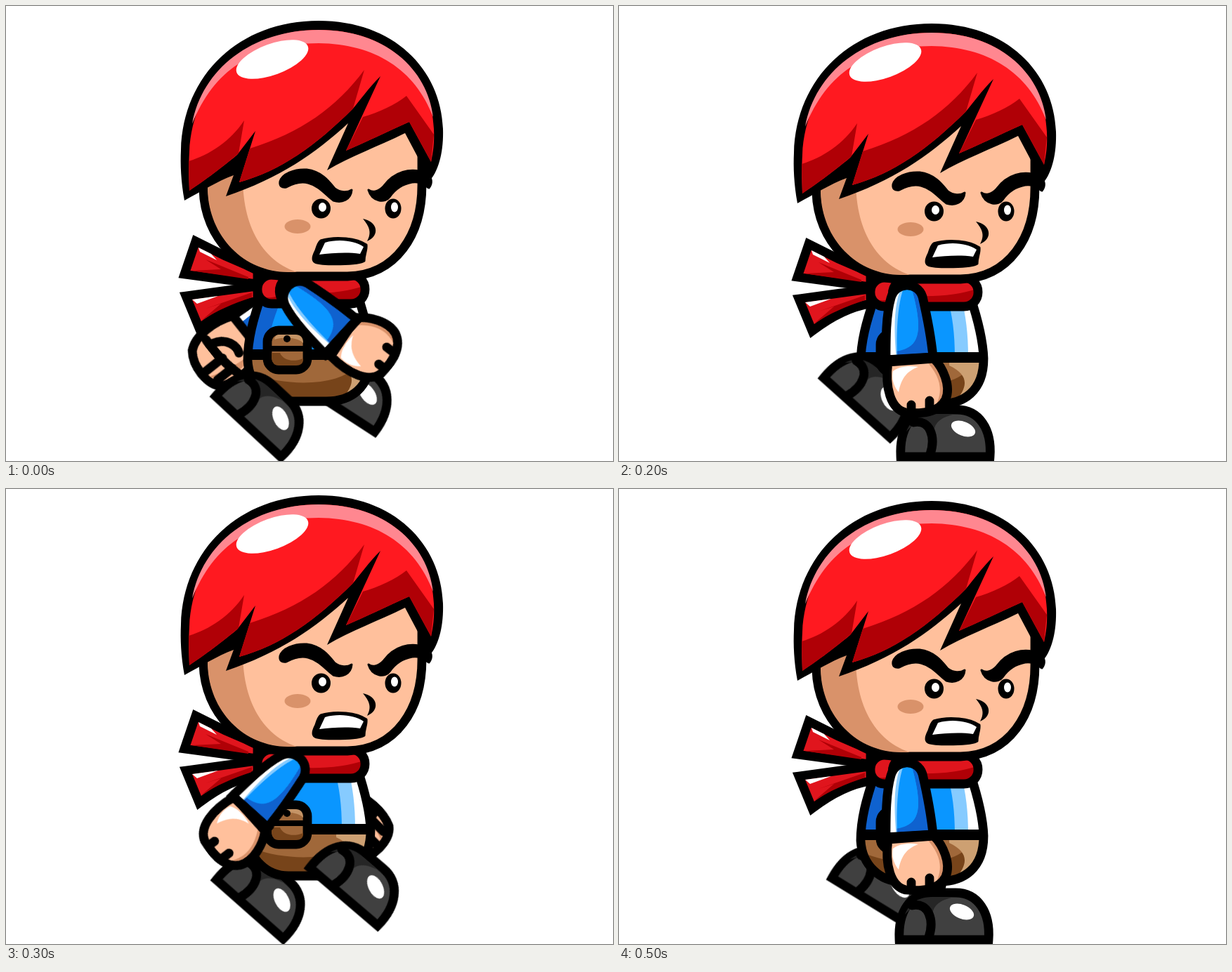
An HTML page without scripts that plays this animation: 864 px wide and 648 px high, repeating every 600 ms.

```html
<!DOCTYPE html>
<html lang="en">
<head>
<meta charset="utf-8">
<title>Running boy</title>
<style>
html, body { margin: 0; width: 100%; height: 100%; overflow: hidden; background: #fff; }
svg { display: block; width: 100vw; height: 100vh; }
.line { stroke: #000; stroke-width: 12.8; }
.round { stroke-linecap: round; stroke-linejoin: round; }
.none { fill: none; }
.ink { stroke: #000; stroke-width: 3; stroke-linejoin: round; }
.skin { fill: #ffc09c; }
.tan { fill: #d9926a; }
.red { fill: #e0151d; }
.dark-red { fill: #b00006; }
.blue { fill: #0a96ff; }
.navy { fill: #0f62cf; }
.white { fill: #fff; }

.body, .boot, .arm, .fist { animation: .6s step-end infinite; }
.body { animation-name: bob; }
.boot.near { animation-name: near-boot; }
.boot.far { animation-name: far-boot; }
.arm.near { animation-name: near-arm; transform-origin: 412px 406px; }
.arm.far { animation-name: far-arm; }
.fist { animation-name: wrist; transform-origin: 415px 499px; }

@keyframes bob {
  0% { transform: translate(0, 0); }
  16.667% { transform: translate(0, 12.5px); }
  33.333% { transform: translate(0, 4px); }
  50% { transform: translate(0, -12px); }
  66.667% { transform: translate(4.5px, -14px); }
  83.333%, 100% { transform: translate(0, -4px); }
}
@keyframes near-boot {
  0% { transform: translate(290px, 556px) rotate(43deg); }
  16.667% { transform: translate(376px, 522px) rotate(140deg); }
  33.333% { transform: translate(283px, 530px) rotate(42deg); }
  50% { transform: translate(424px, 540px) rotate(40.5deg); }
  66.667% { transform: translate(438px, 571px) rotate(10deg); }
  83.333%, 100% { transform: translate(393px, 648px); }
}
@keyframes far-boot {
  0% { transform: translate(410px, 539px) rotate(33deg); }
  16.667% { transform: translate(415px, 565px) rotate(17deg); }
  33.333% { transform: translate(395px, 648px); }
  50% { transform: translate(291px, 557px) rotate(41.5deg); }
  66.667% { transform: translate(378px, 513px) rotate(128deg); }
  83.333%, 100% { transform: translate(295px, 556px) rotate(31.5deg); }
}
@keyframes near-arm {
  0% { transform: rotate(-44deg); }
  16.667% { transform: rotate(-49deg); }
  33.333% { transform: rotate(0deg); }
  50% { transform: rotate(45.5deg); }
  66.667% { transform: rotate(67deg); }
  83.333%, 100% { transform: rotate(0deg); }
}
@keyframes wrist {
  0% { transform: rotate(-8deg); }
  16.667% { transform: rotate(-14deg); }
  33.333% { transform: rotate(0deg); }
  50% { transform: rotate(7deg); }
  66.667% { transform: rotate(4.5deg); }
  83.333%, 100% { transform: rotate(0deg); }
}
@keyframes far-arm {
  0% { transform: translate(420px, 406px) rotate(51.5deg); }
  16.667% { transform: translate(420px, 406px) rotate(55deg); }
  33.333% { transform: translate(420px, 406px) rotate(0deg); }
  50% { transform: translate(398px, 396px) rotate(-45deg); }
  66.667% { transform: translate(396px, 406px) rotate(-58.8deg); }
  83.333%, 100% { transform: translate(420px, 406px) rotate(0deg); }
}
</style>
</head>
<body>
<svg viewBox="0 0 864 648">
  <defs>
    <g id="boot">
      <path class="line" fill="#404040" d="M6 -6C4 -45 20 -73 56 -73H86C118 -73 136 -45 133 -6Z"/>
      <path fill="#262626" d="M14 -42C22 -62 36 -67 56 -67H86C66 -64 56 -56 54 -46C42 -60 28 -58 14 -42Z"/>
      <path class="line round none" d="M24 -55C48 -60 56 -34 48 -10"/>
      <ellipse class="white" cx="95" cy="-46" rx="18" ry="10" transform="rotate(22 95 -46)"/>
    </g>
    <path id="trunk" d="M364 410C352 446 344 474 344 505C346 540 372 563 402 563H456C490 563 519 545 519 498C518 470 510 440 500 410Z"/>
    <clipPath id="trunk-clip"><use href="#trunk"/></clipPath>
    <path id="sleeve" d="M380 500C380 470 380 436 387 412C394 388 425 388 432 410C438 436 444 465 447 496Z"/>
    <clipPath id="sleeve-clip"><use href="#sleeve"/></clipPath>
    <path id="hand" d="M383 503C378 540 387 570 408 575C430 577 455 576 465 556C473 537 461 511 448 498Z"/>
    <clipPath id="hand-clip"><use href="#hand"/></clipPath>
    <rect id="scarf" x="358" y="383" width="153" height="41" rx="20"/>
    <clipPath id="scarf-clip"><use href="#scarf"/></clipPath>
  </defs>

  <g class="body"><g class="arm far">
    <path class="line navy" d="M-26 0L-32 100H32L26 0Z"/>
    <path class="white" d="M-24 58L-18 62L-18 93H-26Z"/>
    <path class="line skin" d="M-33 98C-44 125 -44 158 -30 174C-12 188 24 188 36 172C46 150 42 122 33 98Z"/>
    <path class="tan" d="M26 106C38 136 36 166 14 178C22 158 26 130 26 106Z"/>
    <path class="line round none" d="M-30 149Q4 152 40 142M5 147V176M25 145V172M-20 145C-14 124 4 120 14 124"/>
  </g></g>

  <g class="boot far"><use href="#boot"/></g>

  <g class="body">
    <use href="#trunk" class="blue"/>
    <g clip-path="url(#trunk-clip)">
      <path class="navy" d="M330 400H400C386 430 374 460 372 495H330Z"/>
      <path fill="#86cbff" d="M464 400C474 430 478 460 478 495H530V400Z"/>
      <path class="white" d="M484 400C493 430 497 460 497 495H530V400Z"/>
      <path fill="#77441a" d="M330 496H530V570H330Z"/>
      <path fill="#a0683a" d="M340 496H497V512C480 541 400 543 352 524Z"/>
      <path fill="#cda072" d="M470 500H525V540L478 560C496 540 500 522 470 508Z"/>
      <path d="M330 489H530V504H330Z"/>
    </g>
    <use href="#trunk" class="line none"/>
  </g>

  <g class="boot near"><use href="#boot"/></g>

  <g class="body">
    <rect class="line" x="372" y="462" width="57" height="56" rx="16" fill="#a0683a"/>
    <path fill="#77441a" d="M378 494V502Q379 512 389 512H412Q424 512 423 502C408 508 394 504 390 494Z"/>
    <path fill="#c59466" d="M388 468H412Q423 468 423 480C416 473 400 470 382 475Q383 468 388 468Z"/>
    <path d="M372 484H429V492H372Z"/>
    <circle cx="400" cy="474" r="5"/>

    <g class="line red">
      <path d="M270 335L312 356L358 376V396L254 382Z"/>
      <path d="M256 413L358 399V420C330 424 300 440 275 459Z"/>
    </g>
    <path class="dark-red" d="M264 377L306 375L284 361L345 386V389ZM278 448L306 424L284 431L350 408V415C322 424 300 434 278 448Z"/>
    <path class="white" d="M274 344L292 353L300 362L276 350ZM265 418L302 413L272 424Z"/>

    <use href="#scarf" class="red"/>
    <path class="dark-red" clip-path="url(#scarf-clip)" d="M358 410C375 420 388 414 394 406C430 412 480 410 512 398V425H358Z"/>
    <use href="#scarf" class="line none"/>
    <path class="line round none" d="M396 390C386 400 388 414 396 422"/>

    <path class="line skin" d="M281 220V262C283 330 335 385 402 385H486C556 383 592 325 592 255V140L440 100Z"/>
    <path class="tan" d="M287 225H338C332 300 358 360 414 379H402C338 379 289 328 287 262Z"/>
    <ellipse class="tan" cx="415" cy="314" rx="18.500" ry="10"/>

    <path d="M254 277C249 250 248 225 249 205C252 98 332 21 445 21C552 21 619 90 622 175C623 205 617 232 604 248L586 215L568 181C530 200 490 214 457 234L487 167C440 210 390 245 313 271L324 241C300 250 278 264 254 277Z"/>
    <path id="hair" fill="#ff1920" d="M261 263C260 240 260 225 261 208C266 105 342 34 445 34C545 34 606 95 609 175C610 195 608 208 605 222L574 165C545 178 510 195 484 206L533 100C515 118 505 133 494 146C440 200 390 235 332 251L355 178L329 212C300 236 280 250 261 263Z"/>
    <path class="dark-red" d="M260 221C290 212 320 192 339 163L331 210C300 236 280 250 261 263ZM347 203C420 180 470 145 510 91L494 146C440 200 390 235 332 251ZM508 158C530 152 555 140 570 128L609 183L605 222L574 165C545 178 510 195 484 206Z"/>
    <path fill="#ff8790" d="M265 168C279 90 350 34 445 34C540 34 600 90 608 158C582 90 525 54 445 53C350 54 296 92 265 168Z"/>
    <ellipse class="white" cx="379" cy="76" rx="54" ry="22" transform="rotate(-20 379 76)"/>

    <g class="ink">
      <path d="M390 250C393 239 410 232 428 233C450 236 460 250 468 260C476 266 486 266 492 262C491 276 478 281 466 277C456 270 446 256 430 252C418 249 408 253 399 258C392 259 389 256 390 250Z"/>
      <path d="M516 262C521 266 530 265 538 256C552 237 575 229 598 238C607 244 607 253 602 259C597 256 590 249 578 251C562 254 552 263 546 272C540 281 521 279 516 262Z"/>
      <path d="M448 334C470 327 500 331 513 340C514 348 510 353 510 363C502 369 450 369 440 365C435 362 437 356 441 348C443 341 445 336 448 334Z"/>
    </g>
    <path class="white" d="M454 337C475 331 498 335 509 343L504 353C485 350 463 352 446 354Z"/>
    <ellipse cx="448.500" cy="288.500" rx="13.500" ry="14"/>
    <ellipse cx="551" cy="288.500" rx="11.500" ry="14"/>
    <ellipse class="white" cx="450.500" cy="286.500" rx="5.500" ry="6.500"/>
    <ellipse class="white" cx="553" cy="286.500" rx="5" ry="7"/>
    <path d="M508 303C529 307 533 327 514 335C521 322 517 314 508 303Z"/>

    <g class="arm near">
      <g class="fist">
        <use href="#hand" class="skin"/>
        <g clip-path="url(#hand-clip)">
          <path class="tan" d="M436 500C464 530 460 552 446 574H480V500Z"/>
          <path class="white" d="M390 516C400 509 412 508 426 510C412 515 402 524 398 546C390 536 388 526 390 516Z"/>
        </g>
        <use href="#hand" class="line none"/>
        <path class="line round none" d="M416 564V574M442 558V571"/>
      </g>
      <use href="#sleeve" class="blue"/>
      <g clip-path="url(#sleeve-clip)">
        <path class="navy" d="M416 396C428 440 432 470 412 482C404 487 396 488 384 488V500H450V396Z"/>
        <path class="blue" d="M416 396C428 440 432 470 412 482H394V410Z"/>
        <path fill="#86cbff" d="M375 500V385H412C398 402 394 450 396 500Z"/>
        <path class="white" d="M375 500V390H406C392 410 390 450 395 500Z"/>
      </g>
      <use href="#sleeve" class="line none"/>
      <path class="line none" d="M374 501L454 496"/>
    </g>
  </g>
</svg>
</body>
</html>
```
